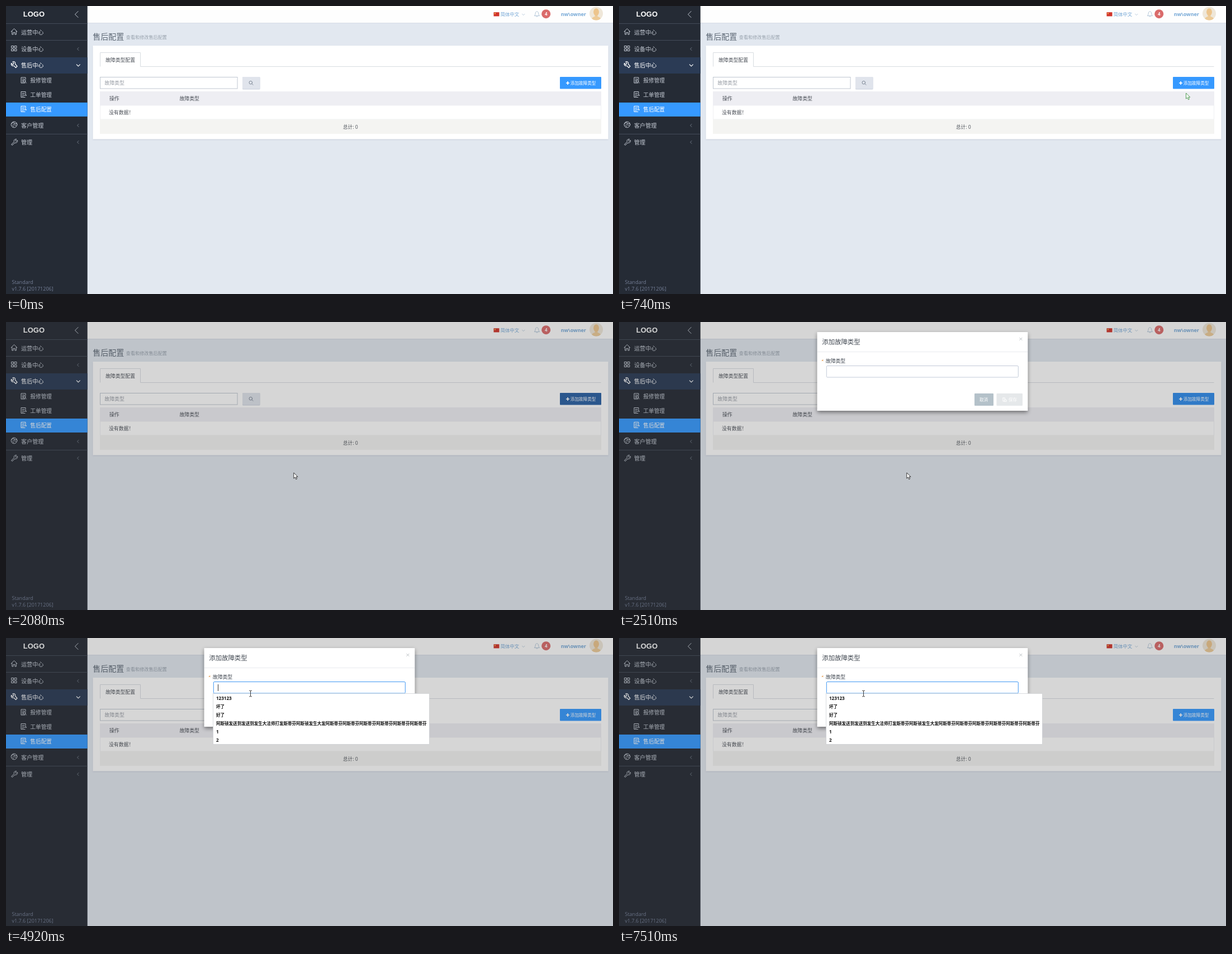
An HTML page for the animation above (8 s loop, 1086 px wide and 516 px high).

```html
<!DOCTYPE html>
<html lang="zh-CN">
<head>
<meta charset="utf-8">
<title>售后配置</title>
<style>
html, body { margin: 0; width: 100%; height: 100%; overflow: hidden; background: #e2e8f0; }
svg { display: block; width: 1086px; height: 516px; font-family: "Open Sans", "Noto Sans CJK SC", "Noto Sans CJK", sans-serif; }
text { white-space: pre; }
.line { fill: none; stroke-linecap: round; stroke-linejoin: round; }
</style>
</head>
<body>
<svg viewBox="0 0 1086 516">
  <defs>
    <filter id="soft" x="-10%" y="-20%" width="120%" height="150%">
      <feDropShadow dx="0" dy="3" stdDeviation="3.5" flood-opacity=".45"/>
    </filter>
    <filter id="faint" x="-5%" y="-10%" width="110%" height="120%">
      <feDropShadow dx="0" dy="1" stdDeviation="1" flood-color="#8090a8" flood-opacity=".3"/>
    </filter>
    <clipPath id="addClip"><rect x="991" y="127" width="74" height="21.5" rx="1"/></clipPath>
    <clipPath id="faceClip"><circle cx="1056" cy="13.5" r="12"/></clipPath>
    <g id="doc" class="line"><path d="M7 10H0V0H8V4M2 3H6M2 5.5H4.5M2 8H4"/></g>
  </defs>

  <rect width="1086" height="516" fill="#e2e8f0"/>

  <!-- top bar -->
  <rect x="145" width="941" height="31" fill="#d5dce6"/>
  <rect x="145" width="941" height="30" fill="#fefefe"/>
  <rect x="872.5" y="11.2" width="10" height="7.2" fill="#d0342c"/>
  <circle cx="875" cy="13.5" r="1.1" fill="#f5d04a"/>
  <g fill="#74a7d6">
    <text x="884.7" y="18.2" font-size="8.35">简体中文</text>
    <text x="992.7" y="18" font-size="8.9" font-weight="700">nw\owner</text>
  </g>
  <g class="line" stroke="#a9bfd4">
    <path d="M923.5 14.3L925.8 16.5 928 14.3" stroke-width=".8"/>
    <path d="M945.6 17.3C947.5 15.5 947 13 947.4 11.8 948.3 9.2 951.5 9.2 952.4 11.8 952.8 13 952.3 15.5 954.2 17.3ZM948.7 18.6Q949.9 20.4 951.1 18.6" stroke-width=".9"/>
  </g>
  <circle cx="966.2" cy="14.2" r="8" fill="#da6b6b"/>
  <text x="966.2" y="17.1" font-size="8" font-weight="700" fill="#fff" text-anchor="middle">4</text>
  <g clip-path="url(#faceClip)">
    <rect x="1044" y="1" width="25" height="25" fill="#efe7d9"/>
    <path d="M1047 27Q1047 20 1053.5 19V15H1058.500V19Q1065 20 1065 27Z" fill="#edcb98"/>
    <ellipse cx="1056" cy="10.800" rx="5" ry="6.500" fill="#edc58d"/>
  </g>

  <!-- page -->
  <text x="155.300" y="59.600" font-size="14" fill="#5d6875">售后配置</text>
  <text x="214.800" y="59.100" font-size="8.150" fill="#99a3ae">查看和修改售后配置</text>
  <rect x="155.500" y="71" width="922" height="167.500" fill="#fff" filter="url(#faint)"/>
  <path d="M168.500 108.500V83.500H240.500V108.500H1064.500" fill="none" stroke="#d8dce1"/>
  <rect x="168.500" y="127.500" width="245.500" height="20.500" fill="#fff" stroke="#bfc6d0"/>
  <rect x="423" y="127" width="31.500" height="22.500" rx="1.500" fill="#c9d0dc"/>
  <rect x="423" y="127" width="31.500" height="21.500" rx="1.500" fill="#e0e4ec"/>
  <g class="line" stroke="#7d8795"><circle cx="437.800" cy="137.200" r="2.800"/><path d="M440 139.400L442 141.400"/></g>
  <rect x="168" y="153" width="897" height="25" fill="#eeeef3"/>
  <rect id="row" x="168.500" y="178" width="896" height="25" fill="#fff" stroke="#eff0f3"/>
  <rect x="168" y="203" width="897" height="26" fill="#f4f4f2"/>
  <g font-size="8.900" fill="#4a4f57">
    <text x="178" y="100.400" font-size="8.850">故障类型配置</text>
    <text x="176.300" y="141.400" fill="#999ea6">故障类型</text>
    <text x="185" y="169.400">操作</text>
    <text x="310.500" y="169.400">故障类型</text>
    <text x="184" y="193.700">没有数据！</text>
    <text x="603" y="220.200" font-size="8.600">总计: 0</text>
  </g>
  <g clip-path="url(#addClip)">
    <rect id="add" x="991" y="127" width="74" height="22" fill="#3699ff"/>
    <circle id="ripple" cx="1021" cy="140" fill="#454a68"/>
  </g>
  <path d="M1002 138H1008M1005 135V141" stroke="#fff" stroke-width="1.700"/>
  <text x="1009.800" y="140.900" font-size="7.600" font-weight="500" fill="#fff">添加故障类型</text>

  <!-- sidebar -->
  <rect width="145.700" height="516" fill="#252b35"/>
  <rect y="92" width="145.700" height="29" fill="#2b3b55"/>
  <rect y="173" width="145.700" height="25" fill="#3699ff"/>
  <path d="M0 31.500H145.700M0 61.500H145.700M0 229.500H145.700" stroke="#444c59"/>
  <text x="30.800" y="18.900" font-size="13" font-weight="700" fill="#fff" style="font-family:'Liberation Sans',Arial,sans-serif">LOGO</text>
  <g font-size="10.100" fill="#c3c9d3">
    <text x="27" y="50.800">运营中心</text>
    <text x="27" y="80.800">设备中心</text>
    <text x="27" y="110" fill="#fff" font-weight="500">售后中心</text>
    <text x="27" y="217.800">客户管理</text>
    <text x="27" y="247.800">管理</text>
    <g font-size="9.700">
      <text x="43.300" y="136.900">报修管理</text>
      <text x="43.300" y="162.900">工单管理</text>
      <text x="43.300" y="188.700" fill="#fff">售后配置</text>
    </g>
  </g>
  <g class="line" stroke="#c3c9d3">
    <path d="M129 9.500L123.500 15 129 20.500"/>
    <path d="M9 46L14.500 40.500 20 46M10.800 45V51H13V47.500H16V51H18.300V45"/>
    <path d="M10 71.500H13.500V75H10ZM15.500 71.500H19V75H15.500ZM10 77H13.500V80.500H10ZM15.500 77H19V80.500H15.500Z"/>
    <path d="M12 100C15 99 17.500 101 16.500 104L20 108 17.500 110.500 14 107C11 108 8.500 105.500 9.500 102.500L12 105 14 103Z" stroke="#fff" stroke-width="1.200"/>
    <use href="#doc" x="27" y="128"/><circle cx="33" cy="134.500" r="2"/><path d="M34.500 136L36.500 138"/>
    <use href="#doc" x="27" y="153.500"/><path d="M32 160H36.500M34.500 158.500L36.500 160"/>
    <g stroke="#fff"><use href="#doc" x="27" y="179.500"/><path d="M32 186H36.500M34.500 184.500L36.500 186"/></g>
    <circle cx="14.500" cy="212.500" r="5.300"/><path d="M9.500 211L13 208.500 17 211 19.500 210M11 214.500L14.500 211 18.500 215.500M12.500 216.500L14.500 214.500"/>
    <path d="M18.500 238.500C15 238 13.500 241 14.500 243.500L9.500 248 11 249.500 16 245C19 246 21.500 243 20.500 240.500L18 242.500 16.800 241Z"/>
    <path d="M126.300 104.800L129.300 107.800 132.300 104.800" stroke="#fff" stroke-width="1.200"/>
    <path d="M130 74.500L127.500 77 130 79.500M130 211.500L127.500 214 130 216.500M130 241.500L127.500 244 130 246.500" stroke="#78818e" stroke-width=".9"/>
  </g>
  <g font-size="9" fill="#747e96">
    <text x="10.500" y="498">Standard</text>
    <text x="10.500" y="509.500">v1.7.6 [20171206]</text>
  </g>

  <rect id="shade" width="1086" height="516" fill="#333"/>

  <!-- dialog -->
  <g id="dialog">
    <rect x="354.700" y="18" width="376.500" height="141" fill="#fff" filter="url(#soft)"/>
    <path d="M355 53.500H731" stroke="#e9ebee"/>
    <text x="363.300" y="39.800" font-size="11.400" fill="#444b54">添加故障类型</text>
    <path d="M716.500 28L721.300 32.800M721.300 28L716.500 32.800" stroke="#b5b9be" stroke-width=".9"/>
    <path d="M362.700 69.500L365.700 67.800M363 67.800L365.400 69.800" stroke="#e39a4c"/>
    <text x="369.800" y="72.500" font-size="8.850" fill="#444b54">故障类型</text>
    <rect id="field" x="371.300" y="78.500" width="343" height="20.500" rx="1.500" fill="#fff" stroke="#c2cad8"/>
    <rect id="caret" x="379" y="83" width="1" height="12" fill="#333"/>
    <rect x="636" y="128" width="34" height="22" rx="1" fill="#b4c1c9"/>
    <rect x="675.500" y="128" width="46.500" height="22" rx="1" fill="#e5e8ea"/>
    <g font-size="7.600" fill="#fff" font-weight="500">
      <text x="645" y="142.100">取消</text>
      <text x="697" y="142.100">保存</text>
    </g>
    <path class="line" d="M687 136H690.500V139M687 136V142H689M690 139.500H693V142.500H690Z" stroke="#fff"/>
  </g>
  <g id="list" font-size="7.540" font-weight="700" fill="#111">
    <rect x="370.500" y="99.500" width="387" height="91" fill="#fff" stroke="#c9ccd1" stroke-width=".7"/>
  </g>

  <!-- pointers -->
  <path id="arrow" d="M0 0V10.200L2.400 8 4 11.800 5.800 11 4.200 7.400H7.200Z" fill="#fff" stroke-width=".9"/>
  <path id="hand" d="M-1 7V1Q0-.7 1 1V5L5 6Q6 6.300 6 7.500V10L5 13H-.5L-3.500 8.500Q-3.500 6.500-1 8Z" fill="#fff" stroke="#222" stroke-width=".8"/>
  <path id="beam" class="line" d="M-2 0H-.7L0 .6 .7 0H2M0 .6V9.900M-2 10.500H-.7L0 9.900 .7 10.500H2" stroke="#222" stroke-width=".9"/>
</svg>
<script>
const LOOP = 8000;
const $ = id => document.getElementById(id);
const set = (id, attrs) => { for (const k in attrs) $(id).setAttribute(k, attrs[k]); };
const show = (id, on) => set(id, { visibility: on ? 'visible' : 'hidden' });
const ramp = (t, a, b) => Math.min(1, Math.max(0, (t - a) / (b - a)));
const mix = (a, b, k) => a + (b - a) * k;
const blend = (a, b, k) => `rgb(${a.map((v, i) => Math.round(mix(v, b[i], k)))})`;

const mash = '阿斯顿发送到发送到发生大法师打发斯蒂芬阿斯顿发生大发' + '阿斯蒂芬'.repeat(6);
['123123', '坏了', '好了', mash, '1', '2'].forEach((label, i) => {
  const row = document.createElementNS('http://www.w3.org/2000/svg', 'text');
  row.setAttribute('x', 376);
  row.setAttribute('y', 110.5 + i * 15.1);
  if (/^\d/.test(label)) row.setAttribute('font-size', 8.1);
  row.textContent = label;
  $('list').append(row);
});

// time, x, y of the pointer tip
const path = [
  [70, 1080, 459], [740, 1014.5, 156], [850, 1015, 155], [1080, 1045, 148],
  [1290, 1045, 148], [1470, 1017, 141], [1680, 1017, 141], [1940, 514.8, 270],
  [2510, 514.8, 270], [3370, 437.5, 96], [3500, 437.5, 95], [3720, 437.5, 94.3]
];
const blinks = [4370, 4920, 5420, 6110, 6590, 7030, 7510];
const blue = [54, 153, 255], deep = [31, 104, 184];

function pointer(t) {
  let i = path.findIndex(p => p[0] > t);
  if (i < 0) i = path.length;
  const a = path[Math.max(0, i - 1)], b = path[Math.min(i, path.length - 1)];
  const k = ramp(t, a[0], b[0] + .001), e = k * k * (3 - 2 * k);
  return [mix(a[1], b[1], e), mix(a[2], b[2], e)];
}

function draw(now) {
  const t = now % LOOP;
  const [x, y] = pointer(t);
  const onButton = t >= 950 && t < 1700;
  const onField = t > 3000 && y < 99;
  const shape = t < 70 ? '' : onButton ? 'hand' : onField ? 'beam' : 'arrow';
  for (const id of ['arrow', 'hand', 'beam']) {
    show(id, id === shape);
    set(id, { transform: `translate(${x} ${y})` });
  }
  set('arrow', { stroke: t < 950 ? '#3f9142' : '#222' });
  set('row', { fill: t < 950 && y > 178 && y < 203 ? '#f4f5f7' : '#fff' });

  const hover = ramp(t, 900, 1080) - ramp(t, 2260, 2600);
  set('add', { fill: blend(blue, deep, hover) });
  const spread = ramp(t, 1880, 2120);
  set('ripple', { r: spread * spread * 72, opacity: t < 1880 ? 0 : .4 * (1 - ramp(t, 1960, 2300)) });

  set('shade', { opacity: .2 * ramp(t, 1890, 2080) });
  const open = ramp(t, 2180, 2510);
  set('dialog', { opacity: open });
  show('dialog', open > 0);

  const focused = t >= 3250;
  set('field', { stroke: focused ? '#3f97f3' : '#c2cad8' });
  show('caret', focused && blinks.filter(b => b <= t).length % 2 === 0);
  show('list', t >= 4120);
}

function tick() {
  draw(performance.now());
  requestAnimationFrame(tick);
}
draw(0);
requestAnimationFrame(tick);
</script>
</body>
</html>
```
